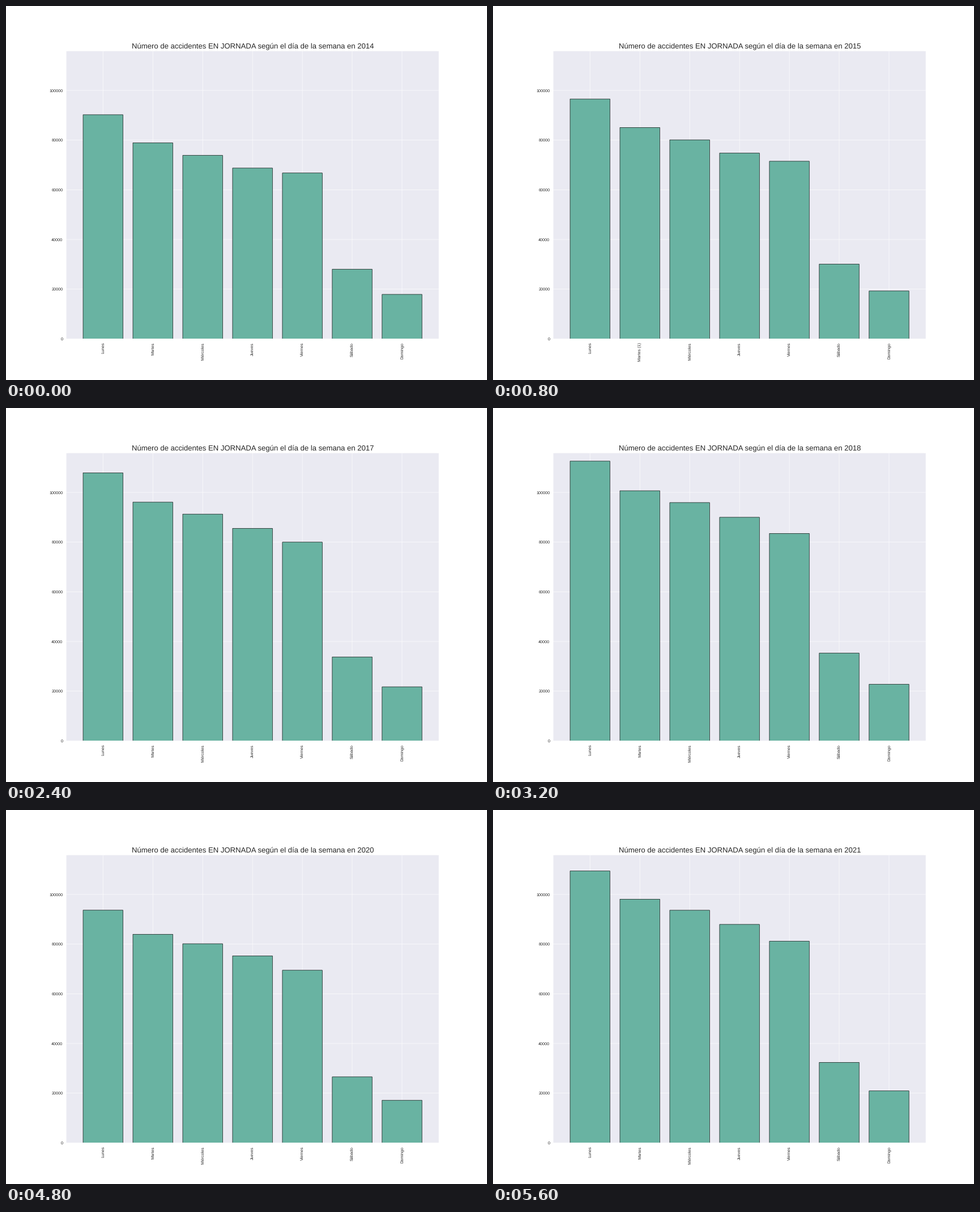
A matplotlib script for the animation above (6400 ms loop, 849 by 660 pixels).

```python
import matplotlib.pyplot as plt
import numpy as np
from matplotlib.animation import FuncAnimation

W, H, DPI = 849, 660, 849 / 18
INK = "#262626"
DAYS = ["Lunes", "Martes", "Miércoles", "Jueves", "Viernes", "Sábado", "Domingo"]
START, PEAK, END = 2014, 2019, 2021

plt.rcParams.update({
    "font.family": "Liberation Sans",
    "text.hinting": "none",
    "text.color": INK,
    "axes.facecolor": "#eaeaf2",
    "axes.edgecolor": "white",
    "axes.linewidth": 1.25,
    "axes.axisbelow": True,
    "grid.color": "white",
    "grid.linewidth": 1,
})

first = np.array([90200, 78900, 73850, 68750, 66750, 28030, 17900])
peak = np.array([115900, 103900, 99180, 93140, 85980, 36400, 23500])
# Share of the peak on (working days, weekends) once growth stops.
after_peak = {2020: (0.808, 0.73), 2021: (0.944, 0.89)}


def accidents(year):
    """Growth that slows towards the peak, then a fall and a partial recovery."""
    if year > PEAK:
        work, weekend = after_peak[year]
        return peak * np.where(np.arange(len(DAYS)) < 5, work, weekend)
    left = (PEAK - year) / (PEAK - START)
    return peak - (peak - first) * left ** 1.27


fig, ax = plt.subplots(figsize=(W / DPI, H / DPI), dpi=DPI, facecolor="white")
bars = ax.bar(range(len(DAYS)), first, color="#69b3a2", edgecolor="black", linewidth=1)
ax.set_xlim(-0.74, 6.74)
ax.set_ylim(0, peak.max())
ax.set_yticks(range(0, 100001, 20000))
ax.set_xticks(range(len(DAYS)), DAYS, rotation=90)
ax.tick_params(length=0, pad=9.5, labelsize=11, labelcolor=INK)
ax.tick_params(axis="y", pad=8.7)
ax.grid(True)
title = ax.set_title("", fontsize=20, x=0.501)

# Thin lines keep their true position between pixels.
for part in [*bars, *ax.get_xgridlines(), *ax.get_ygridlines(),
             *ax.spines.values(), ax.patch]:
    part.set_snap(False)


def draw(i):
    year = START + i
    for bar, value in zip(bars, accidents(year)):
        bar.set_height(value)
    labels = list(DAYS)
    if year == 2015:
        labels[1] += " (1)"
    ax.set_xticklabels(labels)
    title.set_text(f"Número de accidentes EN JORNADA según el día de la semana en {year}")
    return [*bars, title]


anim = FuncAnimation(fig, draw, frames=END - START + 1, interval=800,
                     repeat=True, repeat_delay=0, blit=False)
plt.show()
```
